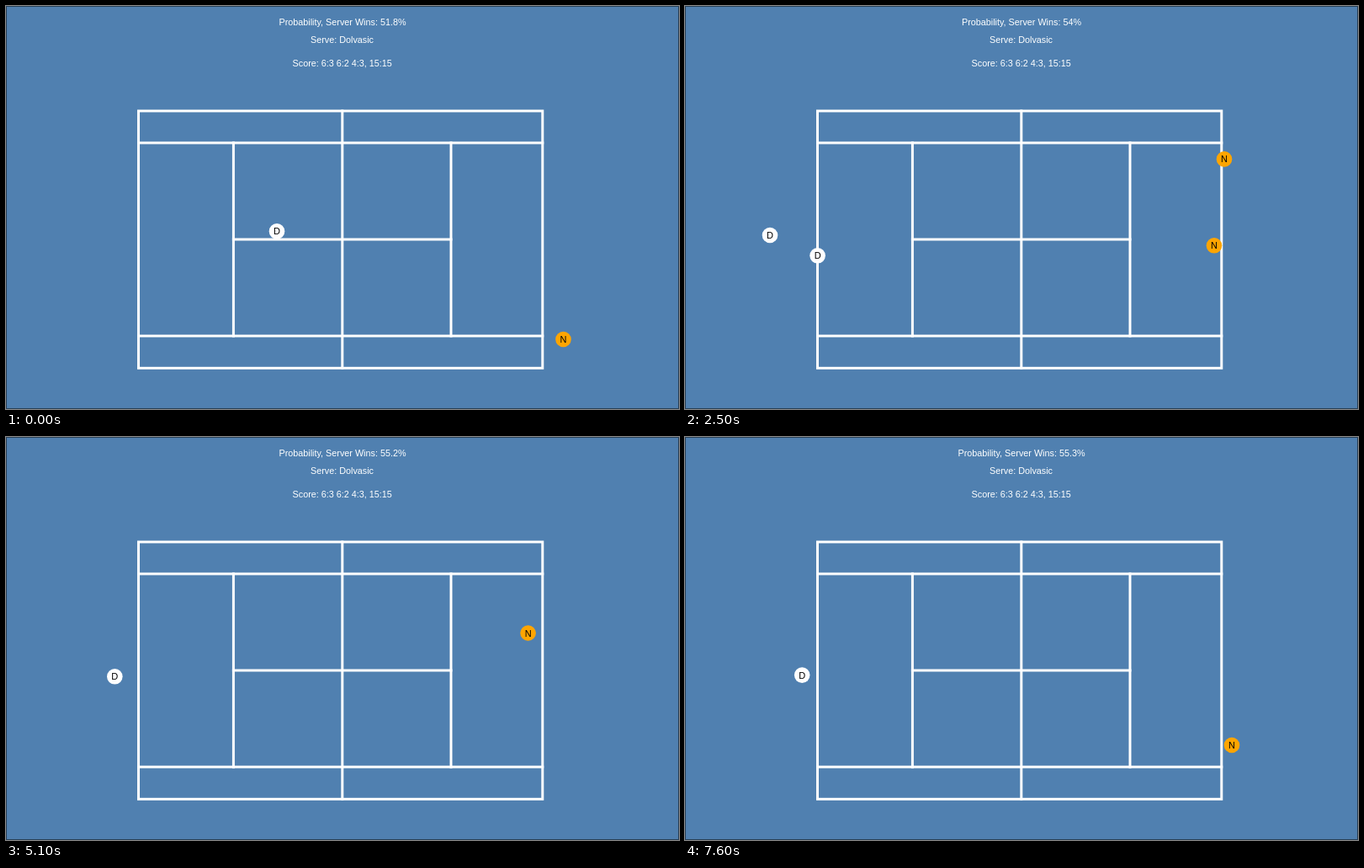
These frames come from a looping animation (800 px wide and 480 px high, 8000 ms). An HTML page with a canvas:

```html
<!DOCTYPE html>
<html lang="en">
<head>
<meta charset="utf-8">
<title>Tennis rally</title>
<style>
  html, body { margin: 0; width: 100%; height: 100%; overflow: hidden; background: #5080b0; }
  canvas { display: block; }
</style>
</head>
<body>
<canvas id="stage" width="800" height="480"></canvas>
<script>
const ctx = document.getElementById('stage').getContext('2d');
const LOOP = 8000, STEP = 100;
const FONT = '"Liberation Sans", Arial, sans-serif';

// Player positions and win probability at the end of each shot
const poses = [
  { d: [322, 268.4], n: [662.5, 397], p: '51.8%' },
  { d: [101, 273], n: [641, 182.4], p: '54%' },
  { d: [129.3, 285.3], n: [620.6, 233.5], p: '55.2%' },
  { d: [139.2, 283.6], n: [650, 367], p: '55.3%' }
];
const shots = [
  { start: 1300, steps: 13 },
  { start: 3900, steps: 13, hitter: 'd', receiver: 'n' },
  { start: 6500, steps: 12, hitter: 'n', receiver: 'd' }
];
const waiting = { d: [157.6, 297.3], n: [629, 285.3] };

const mix = (a, b, k) => a.map((v, i) => v + (b[i] - v) * k);

function line(x1, y1, x2, y2) {
  ctx.beginPath();
  ctx.moveTo(x1, y1);
  ctx.lineTo(x2, y2);
  ctx.stroke();
}

function disc([x, y], r, color) {
  ctx.fillStyle = color;
  ctx.beginPath();
  ctx.arc(x, y, r, 0, Math.PI * 2);
  ctx.fill();
}

function label(text, x, y, color, size) {
  ctx.fillStyle = color;
  ctx.font = `${size}px ${FONT}`;
  ctx.textAlign = 'center';
  ctx.fillText(text, x, y);
}

function player(name, pos) {
  disc(pos, 9.3, name === 'D' ? '#fff' : '#ffa500');
  label(name, pos[0], pos[1] + 4, '#000', 11);
}

function court() {
  ctx.fillStyle = '#5080b0';
  ctx.fillRect(0, 0, 800, 480);
  ctx.lineWidth = 1;
  ctx.strokeStyle = 'rgba(0,0,0,.5)';
  ctx.strokeRect(0.5, 0.5, 799, 479);

  ctx.strokeStyle = '#fff';
  ctx.lineWidth = 3;
  ctx.lineCap = 'square';
  ctx.strokeRect(157.5, 125, 480.3, 306.3);
  for (const y of [163, 393]) line(157.5, y, 637.8, y);
  for (const x of [270.4, 529]) line(x, 163, x, 393);
  line(270.4, 278, 529, 278);
  line(399.8, 125, 399.8, 431.3);
}

function draw(t) {
  let i = 0;
  while (i < 2 && t >= shots[i + 1].start) i++;
  const shot = shots[i], from = poses[i], to = poses[i + 1];
  const step = Math.max(0, Math.min(shot.steps, Math.floor((t - shot.start) / STEP) + 1));
  const k = step / shot.steps;

  court();
  label('Probability, Server Wins: ' + (k > 0.5 ? to.p : from.p), 400, 23, '#fff', 10.8);
  label('Serve: Dolvasic', 399.5, 44, '#fff', 10.8);
  label('Score: 6:3 6:2 4:3, 15:15', 399.7, 72, '#fff', 10.8);

  if (shot.hitter) disc(mix(from[shot.hitter], to[shot.receiver], k), 4, '#ff0');
  if ((i === 0 && k === 1) || (i === 1 && k < 1)) {
    player('D', waiting.d);
    player('N', waiting.n);
  }
  player('D', mix(from.d, to.d, k));
  player('N', mix(from.n, to.n, k));
}

const t0 = performance.now();
function tick() {
  draw((performance.now() - t0) % LOOP);
  requestAnimationFrame(tick);
}
tick();
</script>
</body>
</html>
```
